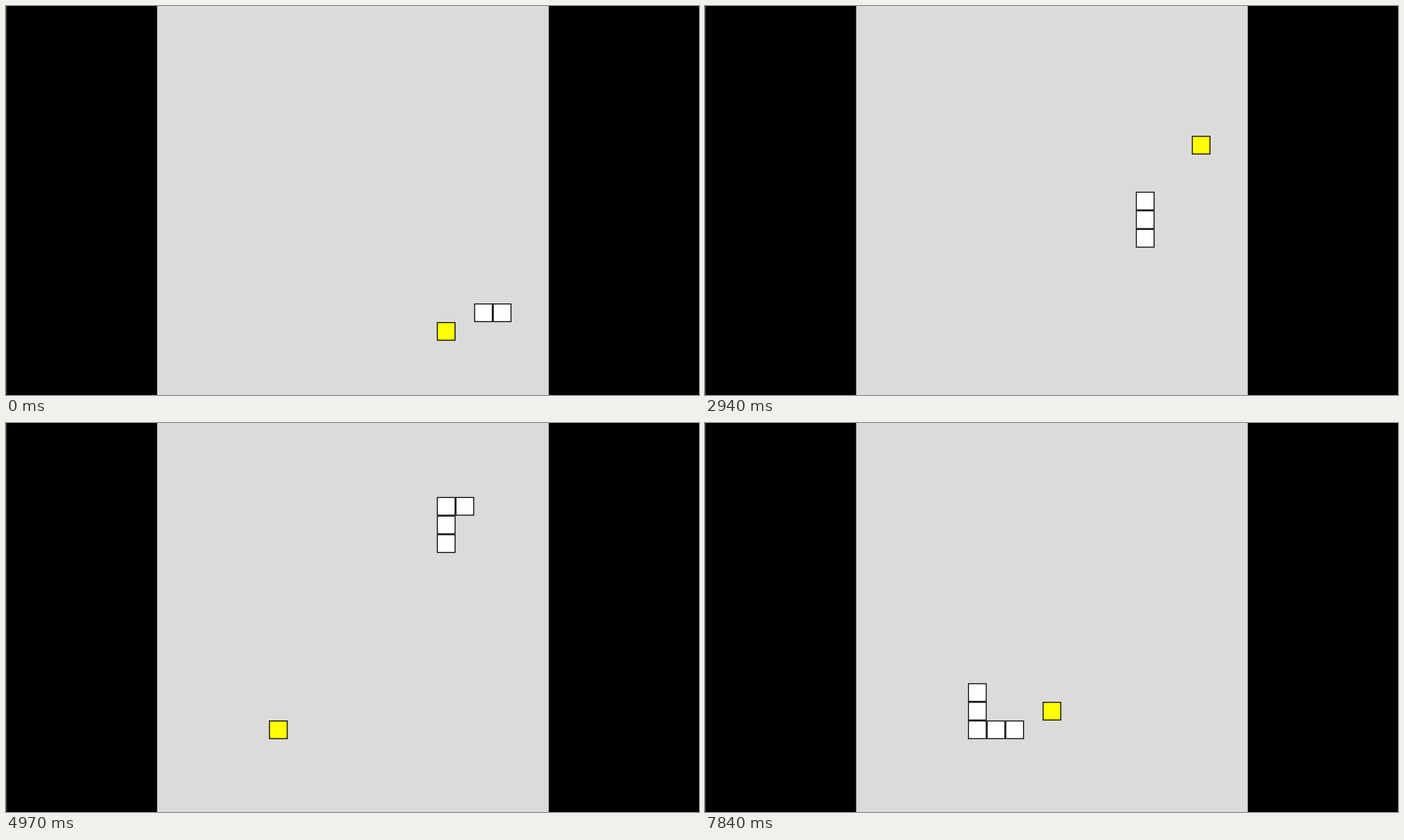
Animation, 998 px wide and 561 px high, one loop 8 s. Source, as an HTML page with a canvas:

```html
<!DOCTYPE html>
<html lang="en">
<head>
<meta charset="utf-8">
<title>Snake</title>
<style>
  html, body { margin: 0; width: 100%; height: 100%; overflow: hidden; background: #000; }
  canvas { display: block; width: 998px; height: 561px; }
</style>
</head>
<body>
<canvas id="stage" width="998" height="561"></canvas>
<script>
const ctx = document.getElementById('stage').getContext('2d');

const LOOP = 8000;
const TICK = 140;
const BOARD = 564;
const CELL = BOARD / 21;
const BORDER = CELL / 20;
const LEFT = 217.65;
const TOP = -0.7;

const STEPS = { R: [1, 0], L: [-1, 0], U: [0, -1], D: [0, 1] };
const ROUTE = 'R2 D4 L5 U12 R3 U4 L3 D12 L9 U2';
const LATE_TICKS = [35, 49];   // moves that land half a tick late

// Each food lies in its cell until the head has reached it.
const FOODS = [
  { col: 15, row: 17, eaten: 14 },
  { col: 18, row: 7, eaten: 27 },
  { col: 6, row: 16, eaten: 54 },
  { col: 10, row: 15, eaten: Infinity }
];

function buildTrail() {
  const trail = [[17, 16], [18, 16]];
  for (const leg of ROUTE.split(' ')) {
    const [dx, dy] = STEPS[leg[0]];
    for (let i = Number(leg.slice(1)); i > 0; i--) {
      const [col, row] = trail[trail.length - 1];
      trail.push([col + dx, row + dy]);
    }
  }
  return trail;
}

const trail = buildTrail();
const lastTick = trail.length - 2;

function fill(color, x, y, width, height) {
  ctx.fillStyle = color;
  ctx.fillRect(x, y, width, height);
}

function drawCell(col, row, color) {
  const x = LEFT + col * CELL;
  const y = TOP + row * CELL;
  const inner = CELL - 2 * BORDER;
  fill('#000', x, y, CELL, CELL);
  fill(color, x + BORDER, y + BORDER, inner, inner);
}

function drawBoard() {
  fill('#000', 0, 0, 998, 561);
  fill('#333', 0, 0, 1.5, 561);
  fill('#dbdbdb', LEFT, 0, BOARD, 561);
}

function draw(time) {
  const beat = time / TICK;
  let tick = Math.min(Math.floor(beat), lastTick);
  if (LATE_TICKS.includes(tick) && beat - tick < 0.5) tick--;

  const length = 2 + FOODS.filter(food => food.eaten < tick).length;
  const food = FOODS.find(f => beat < f.eaten + 0.5);

  drawBoard();
  for (const [col, row] of trail.slice(tick + 2 - length, tick + 2)) {
    drawCell(col, row, '#fff');
  }
  drawCell(food.col, food.row, '#ff0');
}

const start = performance.now();
function frame() {
  draw((performance.now() - start) % LOOP);
  requestAnimationFrame(frame);
}
frame();
</script>
</body>
</html>
```
